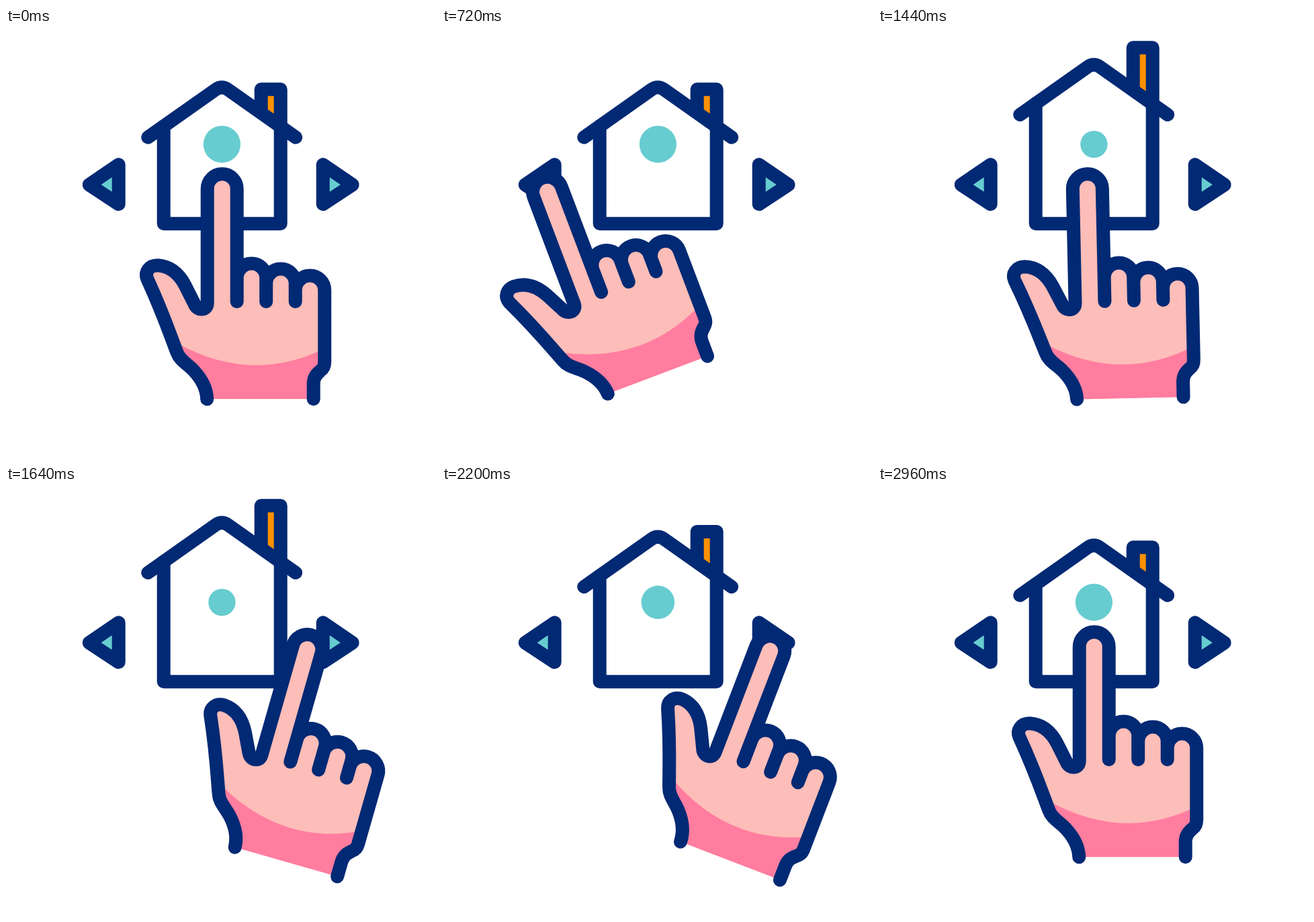
These frames come from a looping animation (640x640 px, 3000 ms). An HTML page with a canvas:

```html
<!DOCTYPE html>
<html lang="en">
<head>
<meta charset="utf-8">
<title>Choosing a house</title>
<style>
  html, body { margin: 0; width: 100%; height: 100%; overflow: hidden; background: #fff; }
  canvas { display: block; }
</style>
</head>
<body>
<canvas id="stage" width="640" height="640"></canvas>
<script>
const ctx = document.getElementById('stage').getContext('2d');
const LOOP = 3000, STEP = 40;
const NAVY = '#022974', TEAL = '#67ccd0', ORANGE = '#ff9100', SKIN = '#fdbdb8', CUFF = '#ff7d9f';

const hand = new Path2D(`M299.5 552 C299 537 293 524 280 510 C270 499 259 495 254.5 482
  C246 460 234 424 210.5 373 C206.5 363 213 353 226 353 C243 354 257 364 267 383
  L281 411 C285 421 300 421 300 409 V239 A22 22 0 0 1 344 239 V407
  V372 A21.75 21.75 0 0 1 387.5 372 V407
  V380 A21.75 21.75 0 0 1 431 380 V407
  V390 A21.75 21.75 0 0 1 474.5 390 V496
  C474.5 503 473 506 468 510 C461 516 458 521 458 530 V552`);
const cuff = new Path2D('M255 469 Q366 530 474 477 L500 552 H240 Z');
const arrows = new Path2D('M168 203 V262 L124 233 Z M472 203 V262 L516 233 Z');

// Eased progress between two moments
function ease(t, start, end) {
  const u = Math.min(1, Math.max(0, (t - start) / (end - start)));
  return u * u * (3 - 2 * u);
}

function paint(path, fill) {
  if (fill) {
    ctx.fillStyle = fill;
    ctx.fill(path);
  }
  ctx.stroke(path);
}

function drawHouse(grow) {
  const lift = 33.7 * grow;
  const roofY = x => 84.8 + Math.abs(x - 321.5) * 0.706 - lift;
  const chimneyTop = 91 - 62 * grow;

  paint(new Path2D(`M380 ${roofY(380)} V${chimneyTop} H409 V${roofY(409)}`), ORANGE);
  ctx.fillStyle = '#fff';
  ctx.fill(new Path2D(`M235 291 V${roofY(235)} L321.5 ${roofY(321.5)} L409 ${roofY(409)} V291 Z`));
  paint(new Path2D(`M235 ${roofY(235)} V291 H409 V${roofY(409)}`));
  paint(new Path2D(`M211.5 ${roofY(211.5)} L312 ${roofY(312)}
    Q321.5 ${roofY(321.5)} 331 ${roofY(331)} L431.5 ${roofY(431.5)}`));

  ctx.fillStyle = TEAL;
  ctx.beginPath();
  ctx.arc(321.7, 172.8, 27.6 - 7.4 * grow, 0, Math.PI * 2);
  ctx.fill();
}

function drawHand(angle) {
  ctx.save();
  ctx.translate(320 + 6.55 * angle, 320);
  ctx.rotate(angle * Math.PI / 180);
  ctx.translate(-320, -320);
  ctx.fillStyle = SKIN;
  ctx.fill(hand);
  ctx.save();
  ctx.clip(hand);
  ctx.fillStyle = CUFF;
  ctx.fill(cuff);
  ctx.restore();
  ctx.stroke(hand);
  ctx.restore();
}

function draw(now) {
  const t = Math.floor(now % LOOP / STEP) * STEP;
  const grow = ease(t, 710, 1215) - ease(t, 1827, 2467);
  const angle = 21 * (2 * ease(t, 1123, 1783) - ease(t, 160, 760) - ease(t, 2266, 2891));

  ctx.fillStyle = '#fff';
  ctx.fillRect(0, 0, 640, 640);
  ctx.strokeStyle = NAVY;
  ctx.lineWidth = 20;
  ctx.lineCap = ctx.lineJoin = 'round';

  ctx.save();
  ctx.translate(-0.3, 0.3);
  paint(arrows, TEAL);
  drawHouse(grow);
  drawHand(angle);
  ctx.restore();
  requestAnimationFrame(draw);
}

draw(0);
</script>
</body>
</html>
```
